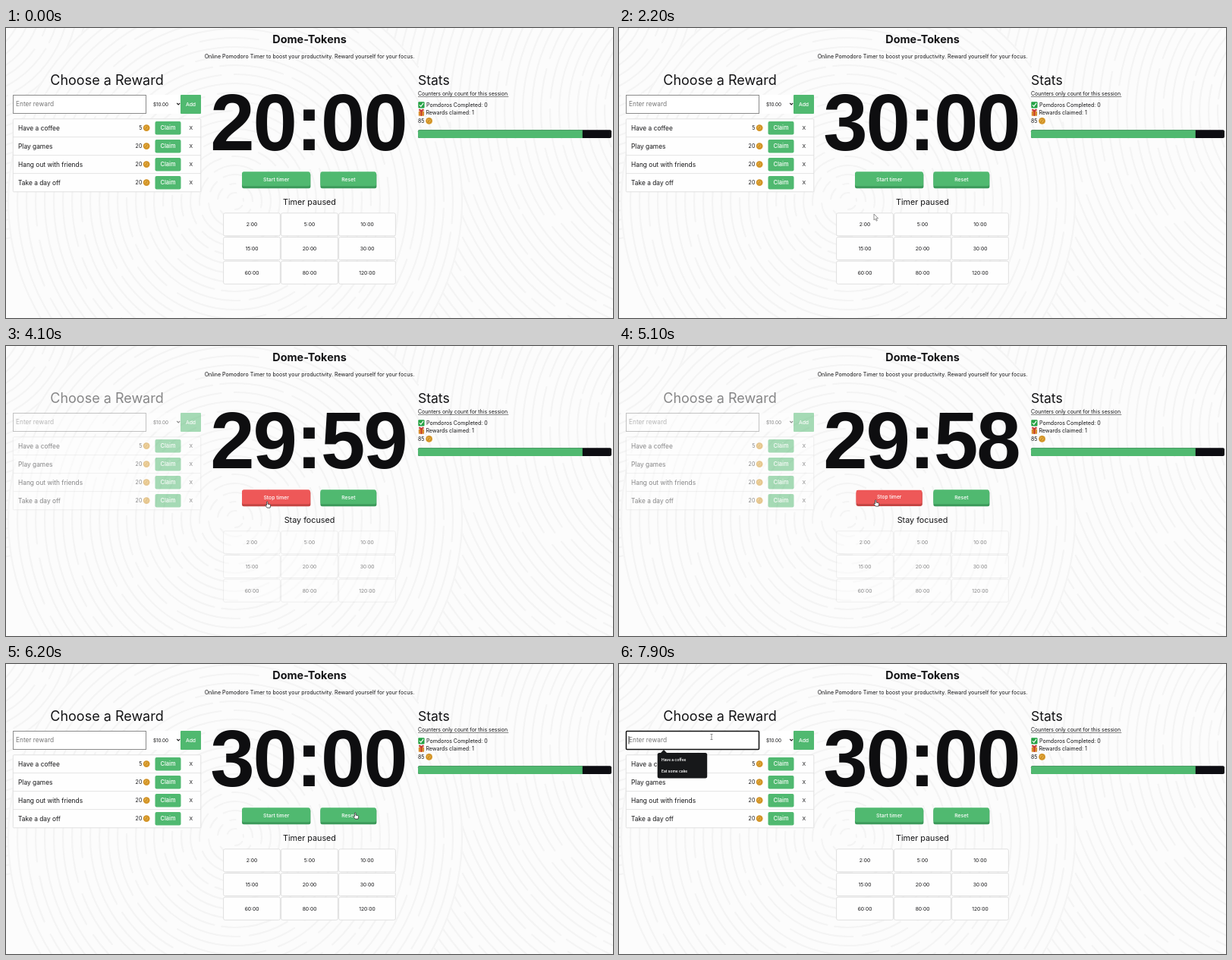
These frames come from a looping animation (800 by 382 pixels, 8 s). An HTML page:

```html
<!DOCTYPE html>
<html lang="en">
<head>
<meta charset="utf-8">
<title>Dome-Tokens</title>
<style>
  html, body { margin: 0; width: 100%; height: 100%; overflow: hidden; background: #fcfcfc; }
  svg { display: block; width: 100vw; height: 100vh; }
  text { font-family: Inter, "Open Sans", sans-serif; fill: #141416; }
  #clock { font-family: "Liberation Sans", Arial, sans-serif; font-weight: 700; letter-spacing: -2px; fill: #0e0e10; }
</style>
</head>
<body>
<svg id="stage" viewBox="0 0 800 382" preserveAspectRatio="none"></svg>
<script>
const NS = 'http://www.w3.org/2000/svg';
const GREEN = '#50b970', DARK_GREEN = '#3d9a5b', RED = '#ee5858', DARK_RED = '#c54543';
const LOOP = 8000, STEP = 100;
const stage = document.getElementById('stage');

function add(parent, tag, attrs = {}, content) {
  const node = document.createElementNS(NS, tag);
  for (const key in attrs) node.setAttribute(key, attrs[key]);
  if (content !== undefined) node.textContent = content;
  parent.appendChild(node);
  return node;
}
const group = (parent, attrs) => add(parent, 'g', attrs);
const box = (parent, x, y, width, height, fill, extra) =>
  add(parent, 'rect', { x, y, width, height, fill, ...extra });
const label = (parent, x, y, size, content, extra) =>
  add(parent, 'text', { x, y, 'font-size': size, ...extra }, content);
const CENTER = { 'text-anchor': 'middle' };
const WHITE = { ...CENTER, 'font-weight': 500, style: 'fill:#fff' };
const show = (node, on) => node.setAttribute('visibility', on ? 'visible' : 'hidden');

// Dashed rings around a few centres, later ones covering earlier ones
function drawBackdrop() {
  let seed = 11;
  const random = () => (seed = (seed * 16807) % 2147483647) / 2147483647;
  const layer = group(stage, { fill: 'none', stroke: '#f4f4f4', 'stroke-width': 2.2, 'stroke-linecap': 'round' });
  const centers = [[-60, -40, 330], [920, 110, 470], [302, 228, 300]];
  for (const [cx, cy, reach] of centers) {
    add(layer, 'circle', { cx, cy, r: reach, fill: '#fcfcfc', stroke: 'none' });
    for (let r = 11; r < reach; r += 12) {
      const dashes = Array.from({ length: 6 }, (_, i) =>
        (i % 2 ? 8 + random() * 14 : r * (0.3 + random() * 1.1)).toFixed(1));
      add(layer, 'circle', {
        cx, cy, r, 'stroke-dasharray': dashes.join(' '), 'stroke-dashoffset': (random() * r * 6).toFixed(1)
      });
    }
  }
}

function drawCoin(parent, x, y) {
  add(parent, 'circle', { cx: x, cy: y, r: 4.4, fill: '#d99a2b' });
  add(parent, 'circle', { cx: x - 0.4, cy: y - 0.3, r: 3.1, fill: '#e5ac3c', stroke: '#b97a1c', 'stroke-width': 0.6 });
  add(parent, 'path', { d: `M${x - 1.3} ${y + 1.6}l1.8-3.4`, stroke: '#b97a1c', 'stroke-width': 1, fill: 'none' });
}

function drawRewards() {
  const panel = group(stage);
  label(panel, 133, 74.8, 18, 'Choose a Reward', CENTER);
  const input = box(panel, 9.5, 88.5, 175, 24, '#fff', { stroke: '#8c8c8c', 'stroke-width': 1 });
  label(panel, 13, 103.4, 8.3, 'Enter reward', { style: 'fill:#757575' });
  const caret = box(panel, 12.6, 95, 0.8, 10.5, '#111');
  box(panel, 186, 88, 44, 25, '#fff');
  label(panel, 194, 102.8, 6.3, '$10.00');
  add(panel, 'path', { d: 'M225.2 99l2 2 2-2', fill: 'none', stroke: '#222', 'stroke-width': 1.1 });
  box(panel, 230, 88, 27, 25, GREEN, { rx: 1 });
  label(panel, 243.5, 102.9, 6.8, 'Add', WHITE);

  box(panel, 9.3, 119.8, 247.5, 96, '#fefefe', { stroke: '#dedede', 'stroke-width': 0.9, rx: 1 });
  const rewards = [['Have a coffee', 5], ['Play games', 20], ['Hang out with friends', 20], ['Take a day off', 20]];
  rewards.forEach(([name, cost], i) => {
    const y = 131.6 + i * 24;
    if (i) box(panel, 9, y - 12.3, 248, 0.8, '#dedede');
    label(panel, 16, y + 2.9, 8.4, name);
    label(panel, 179.3, y + 2.3, 7, cost, { 'text-anchor': 'end' });
    drawCoin(panel, 185.2, y);
    box(panel, 196.5, y - 8.7, 34, 17.5, GREEN, { rx: 2 });
    label(panel, 213.5, y + 2.7, 7.4, 'Claim', WHITE);
    label(panel, 243.7, y + 2.4, 6.7, 'X', CENTER);
  });
  return { panel, input, caret };
}

function drawStats() {
  label(stage, 543, 74.8, 17.5, 'Stats');
  label(stage, 543, 88.8, 6.95, 'Counters only count for this session');
  box(stage, 543, 90.1, 119.3, 0.6, '#333');
  box(stage, 543.3, 97.3, 8.2, 8.2, '#25a244', { rx: 1 });
  add(stage, 'path', { d: 'M545 101.4l1.8 2 3.2-4.5', fill: 'none', stroke: '#fff', 'stroke-width': 1.2 });
  label(stage, 554, 103.8, 7.05, 'Pomdoros Completed: 0');
  box(stage, 543.8, 109.8, 7.2, 6, '#d98a2e', { rx: 0.6 });
  box(stage, 546.6, 109.5, 1.6, 6.4, '#c8332d');
  add(stage, 'path', { d: 'M547.4 109.6c-5-1-2.5-4 0-.6c2.5-3.4 5-.4 0 .6', fill: 'none', stroke: '#c8332d', 'stroke-width': 1.1 });
  label(stage, 553.4, 114.4, 7.05, 'Rewards claimed: 1');
  label(stage, 543, 124.9, 7.05, '85');
  drawCoin(stage, 557.6, 122.4);
  box(stage, 543, 134.2, 255, 10.8, '#0d0d12', { rx: 2 });
  add(stage, 'path', { d: 'M545 134.2H759.8V145H545q-2 0-2-2v-6.800q0-2 2-2z', fill: GREEN });
}

function drawButton(x, width, caption) {
  const node = group(stage);
  const base = box(node, x, 191, width, 20.3, DARK_GREEN, { rx: 2.5 });
  const face = box(node, x, 189.3, width - 0.5, 19, GREEN, { rx: 2.5 });
  const cx = x + width / 2;
  const text = label(node, cx, 201.5, 6.8, caption, WHITE);
  return {
    text,
    color(front, back) { face.setAttribute('fill', front); base.setAttribute('fill', back); },
    press(on) {
      node.setAttribute('transform', on ? `translate(${cx} 200.2) scale(.965) translate(${-cx} -200.2)` : '');
    }
  };
}

function drawPresets() {
  const panel = group(stage);
  const names = ['2:00', '5:00', '10:00', '15:00', '20:00', '30:00', '60:00', '80:00', '120:00'];
  const cells = names.map((name, i) => {
    const x = 286.6 + (i % 3) * 76, y = 243.8 + Math.floor(i / 3) * 31.7;
    const frame = box(panel, x, y, 74.8, 30, '#fefefe', { stroke: '#dcdcdc', 'stroke-width': 0.9, rx: 2 });
    const text = label(panel, x + 37.4, y + 17.6, 6.7, name, CENTER);
    return { x, y, frame, text };
  });
  return { panel, cells };
}

function drawTooltip() {
  const tip = group(stage);
  add(tip, 'path', { d: 'M54.5 117.5l4.5-4.5 4.5 4.5z', fill: '#17181a' });
  box(tip, 50.7, 117, 65.5, 33.5, '#17181a', { rx: 2.5 });
  const style = { 'font-weight': 600, style: 'fill:#fff' };
  label(tip, 56, 128, 4.9, 'Have a coffee', style);
  label(tip, 56, 143.2, 4.9, 'Eat some cake', style);
  return tip;
}

function drawPointers() {
  const outline = { fill: '#fff', stroke: '#333', 'stroke-width': 0.8, 'stroke-linejoin': 'round' };
  return {
    arrow: add(stage, 'path', { ...outline, stroke: '#777', d: 'M0 0v8l1.9-1.7 1.3 2.9 1.2-.6-1.3-2.8h2.5z' }),
    hand: add(stage, 'path', { ...outline, d: 'M-1.4 .2q.7-1 1.4 0v2.900l2.900 .7q.9 .3 .8 1.300l-.6 3h-3.900l-2.500-3.200q.2-1.200 1.900 0z' }),
    beam: add(stage, 'path', { fill: 'none', stroke: '#777', 'stroke-width': 0.8, d: 'M-1.5-3.5h3M0-3.5v7M-1.5 3.5h3' })
  };
}

drawBackdrop();
label(stage, 400, 20, 14.4, 'Dome-Tokens', { ...CENTER, 'font-weight': 700 });
label(stage, 400, 39.5, 7.1, 'Online Pomodoro Timer to boost your productivity. Reward yourself for your focus.', CENTER);
const rewards = drawRewards();
drawStats();
const clock = label(stage, 398.5, 160.5, 105, '', { ...CENTER, id: 'clock' });
const toggle = drawButton(311, 90.4, 'Start timer');
const reset = drawButton(414.4, 74, 'Reset');
const status = label(stage, 400, 233.3, 10.75, '', CENTER);
const presets = drawPresets();
const tooltip = drawTooltip();
const pointers = drawPointers();

// Pointer stops: time, x, y
const route = [
  [100, 90, 96], [800, 474, 286], [1300, 489, 292], [1800, 489, 292], [2200, 336, 245],
  [2700, 345, 205], [4300, 345, 205], [4800, 339, 203], [5300, 339, 203], [5800, 461, 196],
  [6500, 461, 196], [7200, 196, 128], [7500, 122, 96], [LOOP, 122, 96]
];

function pointerAt(t) {
  const i = Math.max(1, route.findIndex(stop => stop[0] >= t));
  const [t0, x0, y0] = route[i - 1], [t1, x1, y1] = route[i];
  const k = Math.max(0, (t - t0) / (t1 - t0)), ease = k * k * (3 - 2 * k);
  return [x0 + (x1 - x0) * ease, y0 + (y1 - y0) * ease];
}
const within = (t, from, to) => t >= from && t < to;
const inside = (x, y, left, top, width, height) => within(x, left, left + width) && within(y, top, top + height);

function clockText(t) {
  if (t < 1700) return '20:00';
  if (within(t, 4000, 5000)) return '29:59';
  if (within(t, 5000, 6000)) return '29:58';
  return '30:00';
}

function render(t) {
  const running = within(t, 3000, 5200);
  const [x, y] = pointerAt(t);

  clock.textContent = clockText(t);
  status.textContent = running ? 'Stay focused' : 'Timer paused';
  rewards.panel.setAttribute('opacity', running ? 0.5 : 1);
  presets.panel.setAttribute('opacity', running ? 0.5 : 1);
  toggle.text.textContent = running ? 'Stop timer' : 'Start timer';
  toggle.color(running ? RED : GREEN, running ? DARK_RED : DARK_GREEN);
  toggle.press(within(t, 2900, 3100) || within(t, 5000, 5200));
  reset.press(within(t, 5900, 6100));

  let overCell = false;
  for (const cell of presets.cells) {
    const hover = t >= 100 && !running && inside(x, y, cell.x + 2, cell.y + 2, 70.8, 26);
    overCell = overCell || hover;
    cell.frame.setAttribute('stroke', hover ? '#c4c4c4' : '#dcdcdc');
    cell.text.style.fill = hover ? GREEN : '';
  }

  const focused = t >= 7600;
  rewards.input.setAttribute('stroke', focused ? '#111' : '#8c8c8c');
  rewards.input.setAttribute('stroke-width', focused ? 1.5 : 1);
  rewards.input.setAttribute('rx', focused ? 1 : 0);
  show(rewards.caret, focused);
  show(tooltip, t >= 7700);

  const overButton = inside(x, y, 311, 189, 91, 22) || inside(x, y, 414, 189, 75, 22) ||
    inside(x, y, 196, 123, 35, 90) || inside(x, y, 230, 88, 27, 25);
  const kind = overCell || overButton ? 'hand' : inside(x, y, 9, 88, 176, 25) ? 'beam' : 'arrow';
  for (const name in pointers) {
    show(pointers[name], t >= 100 && name === kind);
    pointers[name].setAttribute('transform', `translate(${x.toFixed(1)} ${y.toFixed(1)})`);
  }
}

const start = performance.now();
function tick() {
  const t = (performance.now() - start) % LOOP;
  render(Math.floor(t / STEP) * STEP);
  requestAnimationFrame(tick);
}
tick();
</script>
</body>
</html>
```
